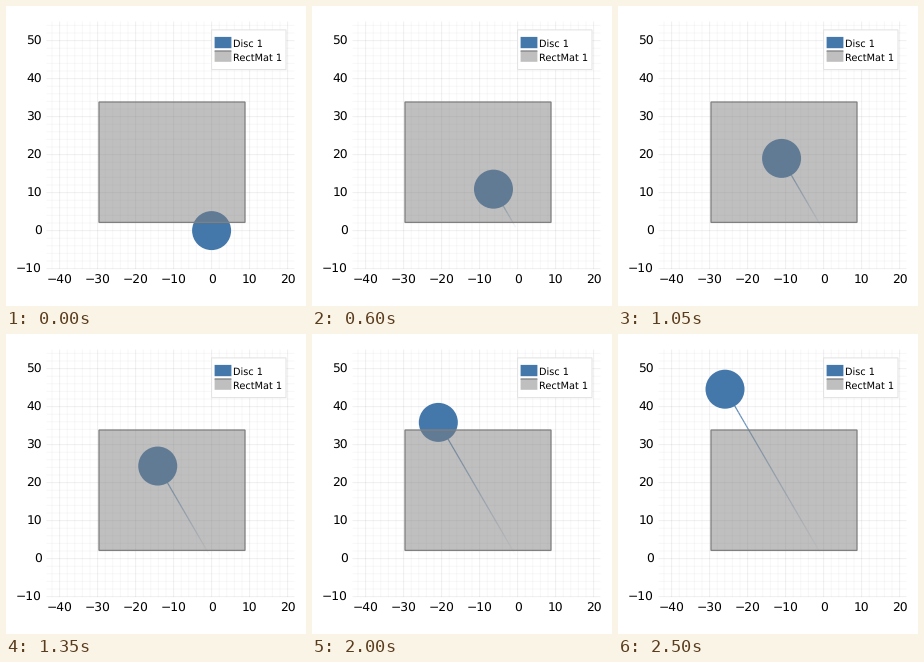
Animation, 300 px wide and 300 px high, one loop 2.55 s. Source, as a matplotlib script:

```python
import numpy as np
import matplotlib.pyplot as plt
from matplotlib.animation import FuncAnimation
from matplotlib.collections import LineCollection
from matplotlib.patches import Circle, Rectangle

SIZE, DPI = 300, 100
FRAMES, INTERVAL = 51, 50
PX = 72 / DPI                       # one pixel in points
SCALE, X0, Y0 = 3.8, 205.6, 224.6   # pixels per unit, pixel of (0, 0)
BLUE, GRAY = "#4477aa", "#808080"
BLUE_RGB = np.array([68, 119, 170]) / 255
HEADING = np.radians(120.2)
SPEED, DRAG = 4.02, 0.002           # pixels per frame, slowing down

plt.rcParams["font.family"] = "DejaVu Sans"
plt.rcParams["text.hinting"] = "none"
fig = plt.figure(figsize=(SIZE / DPI, SIZE / DPI), dpi=DPI, facecolor="white")
ax = fig.add_axes([0, 0, 1, 1])
ax.set_xlim(0, SIZE)
ax.set_ylim(SIZE, 0)
ax.axis("off")


def px(x):
    return X0 + SCALE * x


def py(y):
    return Y0 - SCALE * y


def label(x, y, text, size, **align):
    ax.text(x, y, text, fontsize=size * PX, color="black", zorder=9, **align)


def line(xs, ys, **style):
    ax.plot(xs, ys, snap=False, solid_capstyle="butt", **style)


def box(x0, y0, x1, y1, **style):
    ax.add_patch(Rectangle((x0, y0), x1 - x0, y1 - y0, snap=False, **style))


def draw_grid():
    left, right, top, bottom = 40.5, 288.5, 15.5, 263
    for v in range(-42, 56, 2):
        major = v % 10 == 0
        style = dict(color="black", alpha=0.06 if major else 0.03,
                     lw=PX, zorder=1)
        if v <= 20:
            line([px(v)] * 2, [top, bottom], **style)
        if v >= -10:
            line([left, right], [py(v)] * 2, **style)
        if major:
            name = str(v).replace("-", "\u2212")
            if v <= 20:
                label(px(v), 277.6, name, 12.2, ha="center", va="baseline")
            if v >= -10:
                label(36, py(v) + 4.6, name, 12.2, ha="right", va="baseline")


def draw_mat():
    corners = 93, 96, 239, 216.4
    box(*corners, fc=GRAY, ec="none", alpha=0.5, zorder=4)
    box(*corners, fill=False, ec=GRAY, lw=1.3 * PX, zorder=5)


def draw_legend():
    box(205.6, 23.9, 280, 63.6, fc="white", ec="#e2e2e2", lw=PX, zorder=6)
    box(208.6, 30.9, 225.4, 42.2, fc=BLUE, ec="none", zorder=7)
    box(208.6, 45, 225.4, 55.8, fc="#bfbfbf", ec="none", zorder=7)
    line([208.6, 225.4], [45, 45], color=GRAY, lw=1.3 * PX, zorder=8)
    label(227, 41, "Disc 1", 9.8)
    label(227, 54.4, "RectMat 1", 9.8)


def position(n):
    """Disc centre after n steps, in pixels."""
    d = SPEED * n - DRAG * n ** 2
    return X0 + d * np.cos(HEADING), Y0 - d * np.sin(HEADING)


draw_grid()
draw_mat()
draw_legend()
trail = LineCollection([], linewidths=1.2 * PX, capstyle="butt", zorder=2)
ax.add_collection(trail)
disc = Circle(position(0), 19.5, fc=BLUE, ec="none", zorder=3)
ax.add_patch(disc)


def update(n):
    disc.center = position(n)
    path = np.column_stack(position(np.arange(n + 1)))
    trail.set_segments(np.stack([path[:-1], path[1:]], axis=1))
    fade = np.arange(n) / max(n, 1)
    trail.set_color([(*BLUE_RGB, a) for a in fade])
    return trail, disc


anim = FuncAnimation(fig, update, frames=FRAMES, interval=INTERVAL,
                     repeat=True, repeat_delay=0, blit=False)
plt.show()
```
